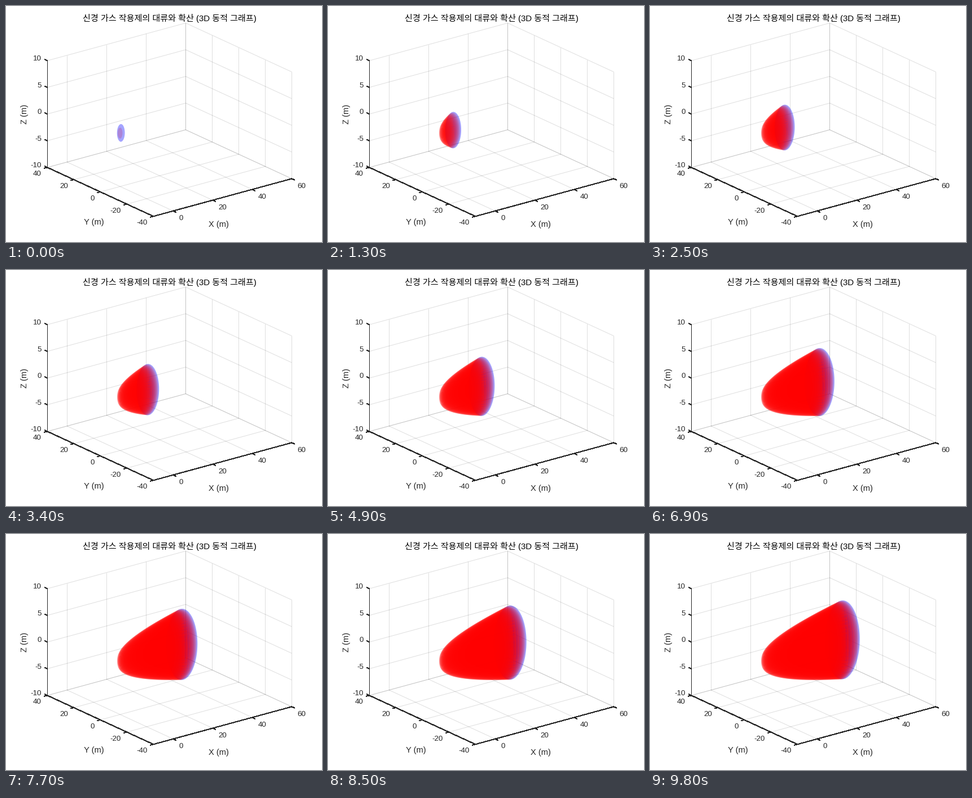
A matplotlib script that plays this animation: 560x420 px, repeating every 9900 ms.

```python
import numpy as np
import matplotlib.pyplot as plt
from matplotlib.animation import FuncAnimation

W, H, DPI = 560, 420, 100
FRAMES, INTERVAL = 99, 100
INK = (0.15, 0.15, 0.15)

plt.rcParams["font.family"] = ["Liberation Sans", "Noto Sans CJK JP"]
plt.rcParams["axes.unicode_minus"] = False

# Oblique view: screen pixels per data unit, measured from the front corner
CORNER = np.array([261.2, 374.3])
LOW = np.array([-10, -40, -10])
AXES = np.array([[3.503, -0.957], [-2.35, -1.0875], [0, -9.5]])


def project(x, y, z):
    return CORNER + (np.array([x, y, z]) - LOW) @ AXES


fig = plt.figure(figsize=(W / DPI, H / DPI), dpi=DPI, facecolor="white")
ax = fig.add_axes([0, 0, 1, 1])
ax.set_xlim(0, W)
ax.set_ylim(H, 0)
ax.axis("off")


def px(size):
    return size * 72 / DPI


def line(p, q, **style):
    ax.plot([p[0], q[0]], [p[1], q[1]], lw=px(1), color=INK,
            solid_capstyle="butt", **style)


def grid(p, q):
    line(project(*p), project(*q), alpha=0.15, zorder=1)


def axis_line(p, q):
    line(p, q, zorder=3, antialiased=False)


def label(x, y, text, size, ha="center", va="baseline", color=INK, **style):
    ax.text(x, y, text, fontsize=px(size), ha=ha, va=va, color=color, **style)


def tick(point, towards):
    step = np.array(towards) / np.hypot(*towards) * 5.5
    axis_line(point, point + step)


XT, YT, ZT = range(0, 61, 20), range(-40, 41, 20), range(-10, 11, 5)

for x in XT:
    grid((x, -40, -10), (x, 40, -10))
    grid((x, 40, -10), (x, 40, 10))
for y in YT:
    grid((-10, y, -10), (60, y, -10))
    grid((60, y, -10), (60, y, 10))
for z in ZT:
    grid((-10, 40, z), (60, 40, z))
    grid((60, -40, z), (60, 40, z))

for a, b in [((-10, 40, 10), (-10, 40, -10)),
             ((-10, 40, -10), (-10, -40, -10)),
             ((-10, -40, -10), (60, -40, -10))]:
    axis_line(project(*a), project(*b))

for x in XT:
    p = project(x, -40, -10)
    tick(p, -AXES[1])
    label(p[0] + 10, p[1] + 16.5, str(x), 13.33, ha="left")
for y in YT:
    p = project(-10, y, -10)
    tick(p, -AXES[0])
    label(p[0] - 10.5, p[1] + 15, str(y), 13.33, ha="right")
for z in ZT:
    p = project(-10, 40, z)
    tick(p, AXES[1])
    label(p[0] - 10, p[1] - 0.2, str(z), 13.33, ha="right")

label(376.6, 393.5, "X (m)", 14.67)
label(156.3, 388.5, "Y (m)", 14.67)
label(33, 192.5, "Z (m)", 14.67, va="center", rotation=90)
label(290, 26.5, "신경 가스 작용제의 대류와 확산 (3D 동적 그래프)", 15.05,
      color="black")

# Cloud: a sphere carried along x while its radius grows with sqrt(t)
WIND, DIFFUSION, DT = 4.0, 1.0, 0.1
RED_ALPHA, BLUE_ALPHA = 0.1, 0.2
FACETS = 30
X0, X1, Y0, Y1 = 188, 380, 110, 266
PIXELS = np.stack(np.meshgrid(np.arange(X0, X1) + 0.5,
                              np.arange(Y0, Y1) + 0.5), axis=-1)

RAY = np.cross(AXES[:, 0], AXES[:, 1])
RAY = RAY / np.linalg.norm(RAY)
UNPROJECT = np.linalg.pinv(AXES)
AZ, EL = np.radians(37.5), np.radians(30)
TO_CAMERA = np.array([-np.sin(AZ) * np.cos(EL) / 70,
                      -np.cos(AZ) * np.cos(EL) / 80,
                      np.sin(EL) / 20])


def facet_depth(point, radius):
    """Depth of the centre of the mesh face that holds each point."""
    lon_step, lat_step = 2 * np.pi / FACETS, np.pi / FACETS
    lon = np.arctan2(point[..., 1], point[..., 0])
    lat = np.arcsin(np.clip(point[..., 2] / radius, -1, 1))
    lon = (np.floor(lon / lon_step) + 0.5) * lon_step
    lat = (np.floor(lat / lat_step) + 0.5) * lat_step
    return radius * (TO_CAMERA[0] * np.cos(lat) * np.cos(lon)
                     + TO_CAMERA[1] * np.cos(lat) * np.sin(lon)
                     + TO_CAMERA[2] * np.sin(lat))


def sphere_layers(i):
    """Coverage, near depth and far depth of the sphere at step i."""
    t = i * DT
    cx, radius = WIND * t, 1 + np.sqrt(4 * DIFFUSION * t)
    base = (PIXELS - project(cx, 0, 0)) @ UNPROJECT
    dist = np.linalg.norm(base, axis=-1)
    slope = np.maximum(np.hypot(*np.gradient(dist)), 1e-3)
    cover = np.clip((radius - dist) / slope + 0.5, 0, 1)
    reach = np.sqrt(np.maximum(radius ** 2 - dist ** 2, 0))[..., None] * RAY
    shift = cx * TO_CAMERA[0]
    return (cover, facet_depth(base - reach, radius) + shift,
            facet_depth(base + reach, radius) + shift)


COVER, NEAR, FAR = (np.array(part, dtype=np.float32) for part in
                    zip(*(sphere_layers(i) for i in range(FRAMES + 1))))
RED, BLUE = np.array([1.0, 0, 0, 1]), np.array([0, 0, 1.0, 1])


def over(image, color, alpha):
    alpha = alpha[..., None]
    return image * (1 - alpha) + color * alpha


def cloud(frame):
    """Red trail of all past spheres mixed with the current blue one."""
    now = frame + 1
    cover = COVER[:now]
    behind = front = 0
    for depth in (NEAR[:now], FAR[:now]):
        behind = behind + (cover * (depth < FAR[now])).sum(axis=0)
        front = front + (cover * (depth > NEAR[now])).sum(axis=0)
    between = np.maximum(2 * cover.sum(axis=0) - behind - front, 0)

    image = np.zeros(behind.shape + (4,))
    blue = BLUE_ALPHA * COVER[now]
    for count, veil in ((behind, blue), (between, blue), (front, None)):
        image = over(image, RED, 1 - (1 - RED_ALPHA) ** count)
        if veil is not None:
            image = over(image, BLUE, veil)
    image[..., :3] /= np.maximum(image[..., 3:], 1e-6)
    return np.clip(image, 0, 1)


picture = ax.imshow(cloud(0), extent=(X0, X1, Y1, Y0), aspect="auto",
                    interpolation="nearest", zorder=2)
ax.set_xlim(0, W)
ax.set_ylim(H, 0)


def update(frame):
    picture.set_data(cloud(frame))
    return [picture]


anim = FuncAnimation(fig, update, frames=FRAMES, interval=INTERVAL,
                     repeat=True, repeat_delay=0)
plt.show()
```
